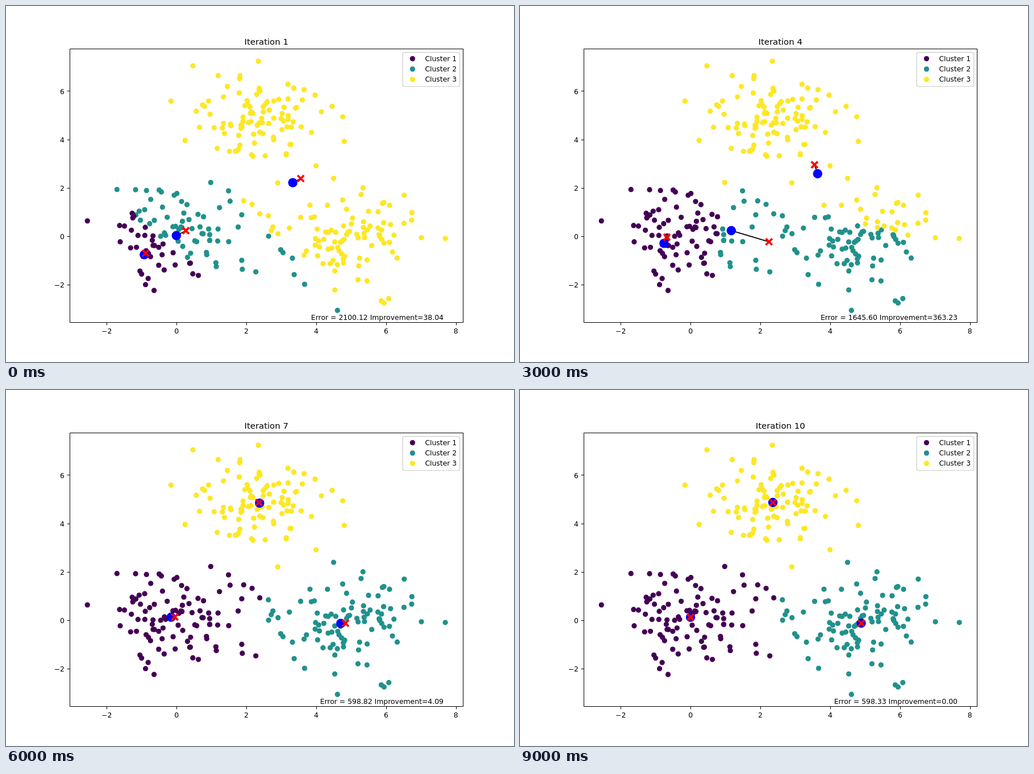
An HTML page for the animation above (10000 ms loop, 894 by 626 pixels).

```html
<!DOCTYPE html>
<html lang="en">
<head>
<meta charset="utf-8">
<title>K-means iterations</title>
<style>
  html, body { margin: 0; width: 100%; height: 100%; overflow: hidden; background: #fff; }
  svg { display: block; }
  text { font: 12.42px "DejaVu Sans", sans-serif; fill: #000; }
  .title { font-size: 14.9px; text-anchor: middle; }
  .middle { text-anchor: middle; }
  .end { text-anchor: end; }
  .axis { fill: none; stroke: #000; stroke-width: 1; }
  .legend { fill: #fff; fill-opacity: .8; stroke: #ccc; stroke-width: 1.24; }
  .trail { stroke: #000; stroke-width: 1.86; }
  .before { fill: #00f; }
  .after { fill: none; stroke: #f00; stroke-width: 3.7; }
</style>
</head>
<body>
<svg id="plot" width="894" height="626" viewBox="0 0 894 626"></svg>
<script>
const COLORS = ['#440154', '#21918c', '#fde725'];
const ERRORS = [2138.16, 2100.12, 2069.42, 2008.83, 1645.6, 838.62, 602.91, 598.82, 598.33, 598.33, 598.33];
const STEP = 1000, STEPS = 10;
const AXES = { left: 111.75, right: 804.6, top: 75.12, bottom: 557.14 };
const svg = document.getElementById('plot');

// MT19937 generator
function mersenne(seed) {
  const s = new Uint32Array(624);
  s[0] = seed;
  for (let i = 1; i < 624; i++) s[i] = Math.imul(1812433253, s[i - 1] ^ (s[i - 1] >>> 30)) + i;
  let k = 624;
  return () => {
    if (k === 624) {
      for (let i = 0; i < 624; i++) {
        const y = (s[i] & 0x80000000) | (s[(i + 1) % 624] & 0x7fffffff);
        s[i] = s[(i + 397) % 624] ^ (y >>> 1) ^ (y & 1 ? 0x9908b0df : 0);
      }
      k = 0;
    }
    let y = s[k++];
    y ^= y >>> 11;
    y ^= (y << 7) & 0x9d2c5680;
    y ^= (y << 15) & 0xefc60000;
    y ^= y >>> 18;
    return y >>> 0;
  };
}

// Polar method: each call gives a pair of standard normal values
function normalPairs(next) {
  const signed = () => {
    const high = next() >>> 5, low = next() >>> 6;
    return 2 * (high * 67108864 + low) / 9007199254740992 - 1;
  };
  return () => {
    let a, b, r;
    do { a = signed(); b = signed(); r = a * a + b * b; } while (r >= 1 || r === 0);
    const f = Math.sqrt(-2 * Math.log(r) / r);
    return [f * b, f * a];
  };
}

const pair = normalPairs(mersenne(0));
const points = [];
for (const [cx, cy] of [[0, 0], [2.5, 5], [5, 0]]) {
  for (let i = 0; i < 100; i++) {
    const [x, y] = pair();
    points.push([x + cx, y + cy]);
  }
}

// Linear scale with a 5% margin around the data
function scale(values, from, to) {
  const min = Math.min(...values), max = Math.max(...values), pad = (max - min) * .05;
  return v => from + (v - min + pad) / (max - min + 2 * pad) * (to - from);
}
const sx = scale(points.map(p => p[0]), AXES.left, AXES.right);
const sy = scale(points.map(p => p[1]), AXES.bottom, AXES.top);

const distance = (p, q) => (p[0] - q[0]) ** 2 + (p[1] - q[1]) ** 2;

function assign(centers) {
  return points.map(p => {
    const d = centers.map(c => distance(p, c));
    return d.indexOf(Math.min(...d));
  });
}

function means(labels, centers) {
  return centers.map((c, k) => {
    const own = points.filter((p, i) => labels[i] === k);
    return [0, 1].map(axis => own.reduce((sum, p) => sum + p[axis], 0) / own.length);
  });
}

const steps = [];
let before = [[-.925, -.745], [-.006, .045], [3.328, 2.235]];
let after = [[-.884, -.681], [.266, .2505], [3.557, 2.405]];
for (let i = 0; i < STEPS; i++) {
  const labels = assign(after);
  steps.push({ before, after, labels });
  before = after;
  after = means(labels, after);
}

function add(tag, attrs, text = '') {
  const el = document.createElementNS('http://www.w3.org/2000/svg', tag);
  set(el, attrs);
  el.textContent = text;
  return svg.appendChild(el);
}
function set(el, attrs) {
  for (const name in attrs) el.setAttribute(name, attrs[name]);
}

const dots = points.map(([x, y]) => add('circle', { cx: sx(x), cy: sy(y), r: 4.65 }));
const trails = COLORS.map(() => add('line', { class: 'trail' }));
const olds = COLORS.map(() => add('circle', { class: 'before', r: 8.2 }));
const news = COLORS.map(() => add('path', { class: 'after', d: 'M-5.6-5.6 5.6 5.6M-5.6 5.6 5.6-5.6' }));

// Axes, ticks and labels
add('rect', { class: 'axis', x: 112.5, y: 75.5, width: 693 - 1, height: 481 });
const label = v => String(v).replace('-', '\u2212');
for (const v of [-2, 0, 2, 4, 6, 8]) {
  const x = Math.round(sx(v)) + .5;
  add('path', { class: 'axis', d: `M${x} 557v4.35` });
  add('text', { class: 'middle', x: sx(v), y: 576 }, label(v));
}
for (const v of [-2, 0, 2, 4, 6]) {
  const y = Math.round(sy(v)) - .5;
  add('path', { class: 'axis', d: `M112 ${y}h-4.35` });
  add('text', { class: 'end', x: 103, y: Math.round(sy(v) + 4.6) }, label(v));
}

// Legend
add('rect', { class: 'legend', x: 698.2, y: 81.7, width: 100.4, height: 59.8, rx: 2.5 });
COLORS.forEach((fill, k) => {
  const y = 92.6 + 18.25 * k;
  add('circle', { cx: 715.4, cy: y, r: 4.65, fill });
  add('text', { x: 737.4, y: Math.round(y + 4.2) }, `Cluster ${k + 1}`);
});

const title = add('text', { class: 'title', x: 458.2, y: 68 });
const status = add('text', { class: 'end', x: 770, y: 552.4 });

function show(i) {
  const { before, after, labels } = steps[i];
  dots.forEach((dot, n) => set(dot, { fill: COLORS[labels[n]] }));
  COLORS.forEach((_, k) => {
    const x1 = sx(before[k][0]), y1 = sy(before[k][1]);
    const x2 = sx(after[k][0]), y2 = sy(after[k][1]);
    set(trails[k], { x1, y1, x2, y2 });
    set(olds[k], { cx: x1, cy: y1 });
    set(news[k], { transform: `translate(${x2} ${y2})` });
  });
  const gain = ERRORS[i] - ERRORS[i + 1];
  title.textContent = `Iteration ${i + 1}`;
  status.textContent = `Error = ${ERRORS[i + 1].toFixed(2)} Improvement=${gain.toFixed(2)}`;
}

let shown = 0;
show(0);
const start = performance.now();
function tick() {
  const i = Math.floor((performance.now() - start) / STEP) % STEPS;
  if (i !== shown) show(shown = i);
  requestAnimationFrame(tick);
}
requestAnimationFrame(tick);
</script>
</body>
</html>
```
